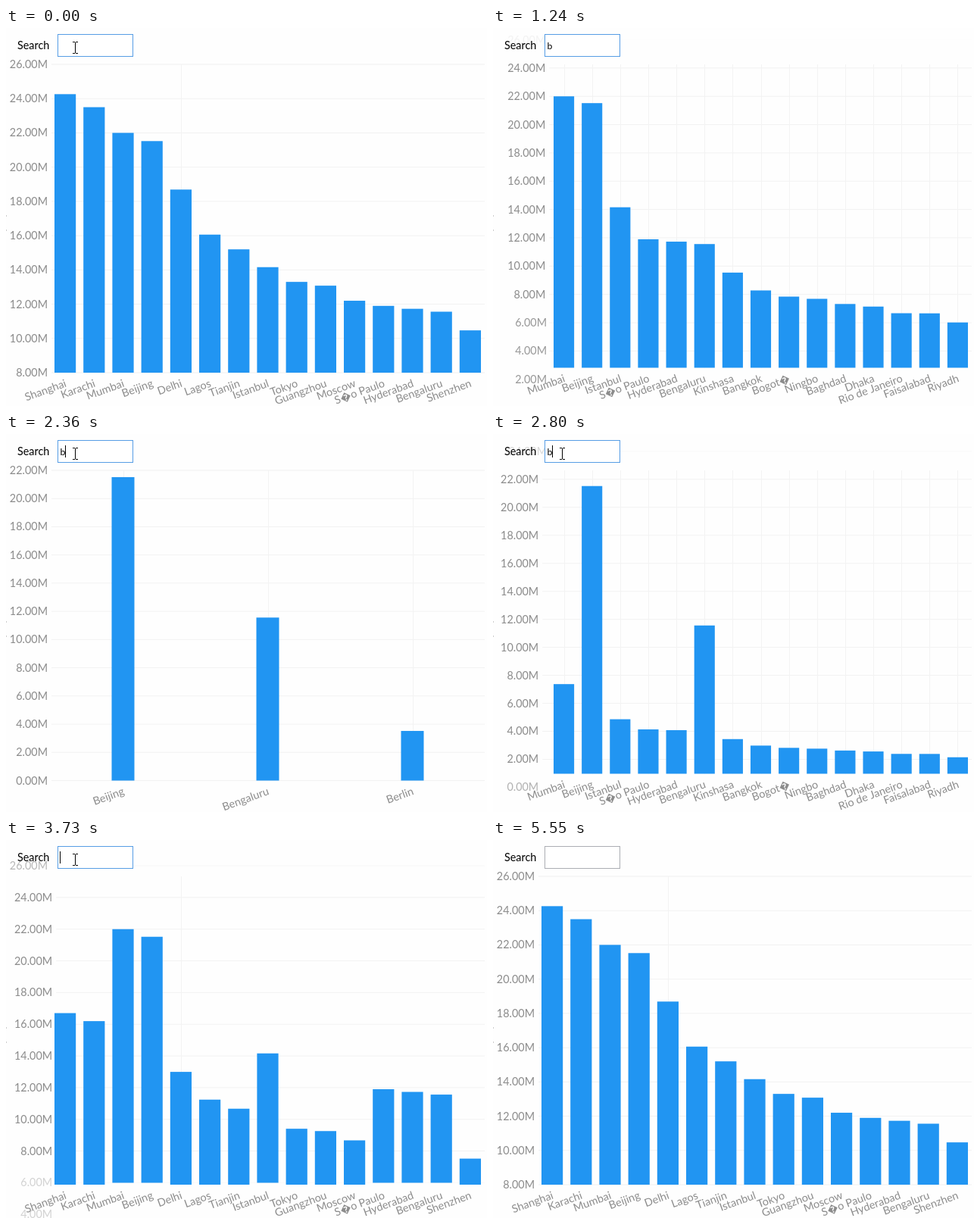
Write an HTML page with a canvas that moves like this. It is 635 by 499 pixels and loops after 5700 ms.

```html
<!DOCTYPE html>
<html lang="en">
<head>
<meta charset="utf-8">
<title>City population search</title>
<style>
  html, body { margin: 0; width: 100%; height: 100%; overflow: hidden; background: #fefefe; }
  canvas { display: block; }
</style>
</head>
<body>
<canvas id="stage" width="635" height="499"></canvas>
<script>
const ctx = document.getElementById('stage').getContext('2d');
const LOOP = 5700, TOP = 48, RIGHT = 632, LABEL = '#8c8c8c';

// Population in millions
const cities = {
  Shanghai: 24.26, Karachi: 23.5, Mumbai: 22, Beijing: 21.52, Delhi: 18.69,
  Lagos: 16.06, Tianjin: 15.2, Istanbul: 14.16, Tokyo: 13.3, Guangzhou: 13.08,
  Moscow: 12.2, 'S\uFFFDo Paulo': 11.9, Hyderabad: 11.73, Bengaluru: 11.56, Shenzhen: 10.47,
  Kinshasa: 9.73, Bangkok: 8.28, 'Bogot\uFFFD': 7.78, Ningbo: 7.6, Baghdad: 7.18,
  Dhaka: 6.97, 'Rio de Janeiro': 6.43, Faisalabad: 6.42, Riyadh: 5.68, Berlin: 3.52
};
const names = Object.keys(cities);
const matchesB = ['Mumbai', 'Beijing', 'Istanbul', ...names.slice(11, 14), ...names.slice(15, 24)];
const matchesBe = ['Beijing', 'Bengaluru', 'Berlin'];

// Chart layouts: value range, baseline, right edge of the axis labels
const all = { names: names.slice(0, 15), min: 8, max: 26, bottom: 455, labelEnd: 55, columns: [4] };
const withB = { names: matchesB, min: 2, max: 24, bottom: 448.5, labelEnd: 71 };
const withBe = { names: matchesBe, min: 0, max: 22, bottom: 457.5, labelEnd: 55 };

const changes = [
  { at: 0, start: -999, length: 1, from: all, to: all },
  { at: 1030, start: 1000, length: 270, from: all, to: withB },
  { at: 1770, start: 1770, length: 260, from: withB, to: withBe },
  { at: 2710, start: 2710, length: 280, from: withBe, to: withB },
  { at: 3600, start: 3577, length: 250, from: withB, to: all }
];
const typing = [[0, ''], [530, 'b'], [1410, 'be'], [2360, 'b'], [3190, '']];
const caretOn = [[120, 1060], [1410, 1940], [2360, 2890], [3190, 3740], [4200, 4690], [5270, 5550]];
const pointer = [
  [0, 'beam', 91, 26], [530], [1900, 'beam', 91, 26], [4060, 'beam', 112, 14],
  [4100, 'arrow', 265, 22], [4150, 'arrow', 545, 55], [4200],
  [5030, 'arrow', 616, 493], [5060, 'arrow', 612, 494], [5300]
];

const lerp = (a, b, p) => a + (b - a) * p;
const latest = (list, t, time) => list.filter(item => time(item) <= t).pop();
const first = item => item[0];
const yOf = (s, v) => s.bottom - (v - s.min) * (s.bottom - TOP) / (s.max - s.min);
const shows = (s, v) => v >= s.min && v <= s.max;

function rect(x, y, w, h, color) {
  ctx.fillStyle = color;
  ctx.fillRect(x, y, w, h);
}

function text(str, x, y, size, color, align = 'left') {
  ctx.font = `${size}px Lato, Carlito, sans-serif`;
  ctx.textAlign = align;
  ctx.fillStyle = color;
  ctx.fillText(str, x, y);
}

function drawAxis(from, to, p) {
  const lineStart = lerp(from.labelEnd, to.labelEnd, p) + 5;
  for (let v = 0; v <= 26; v += 2) {
    const before = shows(from, v), after = shows(to, v);
    if (!before && !after) continue;
    const y = lerp(yOf(from, v), yOf(to, v), p);
    ctx.globalAlpha = before && after ? 1 : after ? p : 1 - p;
    if (y <= to.bottom + 1) rect(lineStart, y - 0.5, RIGHT - lineStart, 1, '#f2f2f2');
    text(v.toFixed(2) + 'M', before ? lineStart - 5 : to.labelEnd, y + 5, 14.4, LABEL, 'right');
  }
  ctx.globalAlpha = 1;
}

function drawBars(from, to, p) {
  const left = to.labelEnd + 4;
  const step = (RIGHT - left) / to.names.length;
  const width = Math.min(30, step - 10);
  to.names.forEach((name, i) => {
    const x = left + (i + 0.5) * step, value = cities[name];
    const kept = from.names.includes(name);
    const y = lerp(kept ? yOf(from, value) : to.bottom, yOf(to, value), p);
    const base = kept ? Math.min(to.bottom, lerp(from.bottom, to.bottom, p)) : to.bottom;
    if (!to.columns || to.columns.includes(i)) rect(Math.round(x), TOP, 1, to.bottom - TOP, '#f3f3f3');
    rect(x - width / 2, y, width, Math.max(0, base - y), '#2195f2');
    ctx.save();
    ctx.translate(x + 2.5, to.bottom + 18);
    ctx.rotate(-20 * Math.PI / 180);
    text(name, 0, 0, 14.4, LABEL, 'right');
    ctx.restore();
  });
}

function drawSearch(t) {
  text('Search', 15, 28, 14.4, '#000');
  rect(68, 8, 100, 30, t < 5550 ? '#569de5' : '#abadb3');
  rect(69, 9, 98, 28, '#fff');
  const typed = latest(typing, t, first)[1];
  text(typed, 71.5, 28, 12.2, '#000');
  if (caretOn.some(([on, off]) => t >= on && t < off)) {
    rect(71 + Math.round(ctx.measureText(typed).width), 15, 1, 16, '#000');
  }
}

function drawPointer(t) {
  const [, shape, x, y] = latest(pointer, t, first);
  if (shape === 'beam') {
    rect(x, y - 7, 1, 14, '#000');
    for (const edge of [y - 8, y + 7]) {
      rect(x - 3, edge, 3, 1, '#000');
      rect(x + 1, edge, 3, 1, '#000');
    }
  } else if (shape === 'arrow') {
    ctx.save();
    ctx.translate(x + 0.5, y + 0.5);
    const path = new Path2D('M0 0V16L4 12.5L6.5 18L9 17L6.5 11.5H11.5Z');
    ctx.fillStyle = '#fff';
    ctx.strokeStyle = '#000';
    ctx.fill(path);
    ctx.stroke(path);
    ctx.restore();
  }
}

function draw() {
  const t = performance.now() % LOOP;
  const { from, to, start, length } = latest(changes, t, c => c.at);
  const p = Math.max(0, Math.min(1, (t - start) / length));
  rect(0, 0, 635, 499, '#fefefe');
  rect(0, 247, 1, 2, '#ccc');
  rect(0, 266, 1, 2, '#ccc');
  drawAxis(from, to, p);
  drawBars(from, to, p);
  drawSearch(t);
  drawPointer(t);
  requestAnimationFrame(draw);
}
draw();
</script>
</body>
</html>
```
